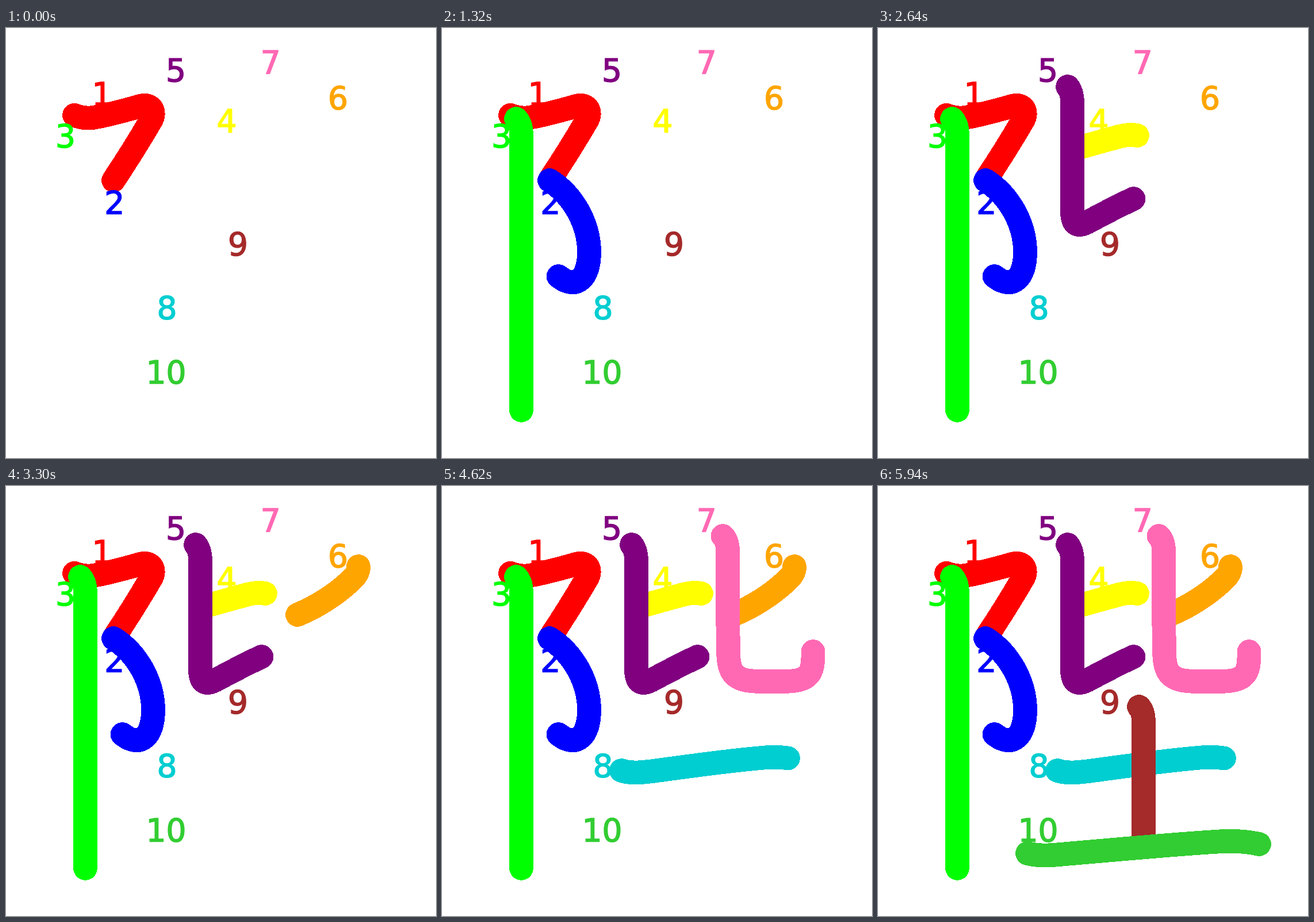
An HTML page for the animation above (6600 ms loop, 748x748 px).

```html
<!DOCTYPE html>
<html lang="en">
<head>
<meta charset="utf-8">
<title>Stroke order</title>
<style>
  html, body { margin: 0; width: 100%; height: 100%; overflow: hidden; background: #fff; }
  svg { display: block; width: 100vw; height: 100vh; }
  path { fill: none; stroke-width: 41.7; stroke-linecap: round; stroke-linejoin: round; shape-rendering: crispEdges; }
  text { font: 55px "DejaVu Sans", Verdana, sans-serif; stroke-width: 1.5; }
</style>
</head>
<body>
<svg viewBox="0 0 748 748"></svg>
<script>
const STEP = 660;

// colour, label x, label baseline, stroke path
const strokes = [
  ['red', 149.5, 134, 'M119 151.7C134 158 146 157.5 158 154.8C185 149.7 212 142 235 135.5C253 131 261 146 252 161C231 197 209 232 187 265'],
  ['blue', 171.3, 323, 'M187 265C228 291 256 340 256 390C256 432 236 458 202.5 432'],
  ['lime', 86, 206.5, 'M129 158C135 164 138 174 138 186V665'],
  ['yellow', 366.6, 181, 'M346 209C362 205 385 198 408 192C424 187.5 437 184 451 187'],
  ['purple', 278, 93, 'M330 102C335 108 338 118 338 130V320C338 341 346 347 364 338C390 324 417 310 444.5 297'],
  ['orange', 560, 141, 'M613 140C614 151 606 159 597 167C571 191 540 210 507 224'],
  ['hotpink', 442.8, 79, 'M488.5 87C494 92 497 102 497 112V200C497 240 498 270 498 285C498 328 509 340 556 340H592C640 340 646 327 645.5 288'],
  ['darkturquoise', 262.5, 505.5, 'M312 495C331 501 348 498 367 496C433 487 498 478 550 473.5C571 471 586 471 602 473.5'],
  ['brown', 386, 394.5, 'M454 384C460 390 462 400 462 410V620'],
  ['limegreen', 243.5, 617.5, 'M260 639C279 644 298 643 316 641C410 633 505 624 585 619C613 616.5 638 617.5 663 623']
];

const svg = document.querySelector('svg');

function add(tag, attrs) {
  const el = document.createElementNS(svg.namespaceURI, tag);
  for (const name in attrs) el.setAttribute(name, attrs[name]);
  return svg.appendChild(el);
}

strokes.forEach(([color, , , d], i) => {
  const path = add('path', { d, stroke: color });
  const offset = i / strokes.length;
  if (i) path.animate([
    { opacity: 0, offset: 0 },
    { opacity: 0, offset },
    { opacity: 1, offset },
    { opacity: 1, offset: 1 }
  ], { duration: STEP * strokes.length, iterations: Infinity });
});

strokes.forEach(([color, x, y], i) => {
  add('text', { x, y, fill: color, stroke: color }).textContent = i + 1;
});
</script>
</body>
</html>
```
